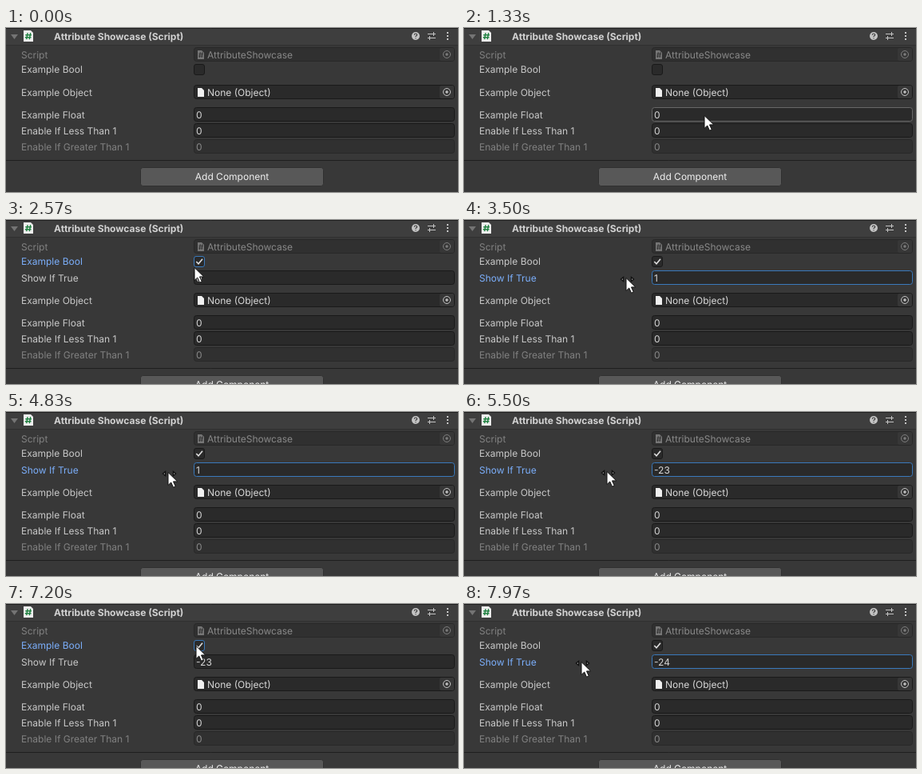
An HTML page for the animation above (8000 ms loop, 566 by 205 pixels).

```html
<!DOCTYPE html>
<html lang="en">
<head>
<meta charset="utf-8">
<title>Inspector</title>
<style>
html, body { margin: 0; width: 100%; height: 100%; overflow: hidden; background: #383838; }
svg { display: block; }
text { font: 12px Inter, sans-serif; fill: #c8c8c8; white-space: pre; text-rendering: geometricPrecision; }
.title { font-weight: 700; fill: #d2d2d2; }
.value { fill: #d8d8d8; }
.button { fill: #eee; }
.disabled { opacity: .5; }
.box { fill: #2a2a2a; stroke: #191919; }
.box.hover { stroke: #686868; }
.box.focus { stroke: #3a79bb; }
text.focus { fill: #7baefa; }
</style>
</head>
<body>
<svg id="stage" width="566" height="205" viewBox="0 0 566 205">
  <rect width="566" height="205" fill="#383838"/>
  <rect width="566" height="21" fill="#3e3e3e"/>
  <path d="M0 .5H566" stroke="#1f1f1f"/>
  <path d="M0 21.5H566" stroke="#303030"/>
  <path d="M6 8H15L10.5 14Z" fill="#747474"/>
  <path d="M22 3H31L34 6V17H22Z" fill="#eee"/>
  <path d="M27.1 6.2L25.7 14.2M30.7 6.2L29.3 14.2M24.3 8.8H32M23.8 11.7H31.5" stroke="#1f8040" stroke-width="1.4" fill="none"/>
  <text class="title" x="60" y="15">Attribute Showcase (Script)</text>
  <circle cx="513" cy="10" r="5" fill="#c4c4c4"/>
  <path d="M511.3 8.6Q511.5 7 513 7T514.7 8.6Q514.6 9.6 513 10.3V11M513 12.2V13.3" fill="none" stroke="#3e3e3e" stroke-width="1.2"/>
  <path d="M528 7.5H538M535.5 5V10M528 12.5H538M530.5 10V15" stroke="#c4c4c4"/>
  <path d="M552 5h2v2h-2zM552 9h2v2h-2zM552 13h2v2h-2z" fill="#c4c4c4"/>
  <g id="rows"></g>
  <g id="lower">
    <path d="M0 165.5H566" stroke="#1f1f1f"/>
    <rect x="168.5" y="174.5" width="229" height="23" rx="3" fill="#585858" stroke="#303030"/>
    <text class="button" x="283" y="190" text-anchor="middle">Add Component</text>
  </g>
  <g id="pointer">
    <path d="M1 .5V16.5L4.7 13L7.5 19.2L10.3 18L7.5 11.9H12.7Z" fill="#fff" stroke="#111" stroke-width="1"/>
    <path id="slide" d="M-5.5 2L-2.5 -.5V4.5ZM10.5 2L7.5 -.5V4.5Z" fill="#fff" stroke="#111" stroke-width="1.5"/>
  </g>
</svg>
<script>
const $ = id => document.getElementById(id);
const LOOP = 8000;

function add(parent, tag, attrs = {}, content = '') {
  const el = document.createElementNS('http://www.w3.org/2000/svg', tag);
  for (const key in attrs) el.setAttribute(key, attrs[key]);
  el.textContent = content;
  parent.appendChild(el);
  return el;
}

function addRow(parent, name, top, { disabled = false, value = '0', object = false } = {}) {
  const g = add(parent, 'g', disabled ? { class: 'disabled' } : {});
  const label = add(g, 'text', { x: 19, y: top + 13 }, name);
  const box = add(g, 'rect', { class: 'box', x: 235.5, y: top - .5, width: 326, height: 17, rx: 3 });
  const text = add(g, 'text', { class: 'value', x: object ? 252 : 238, y: top + 13 }, value);
  if (object) {
    add(g, 'rect', { x: 543, y: top, width: 18, height: 16, rx: 2, fill: '#373737' });
    add(g, 'circle', { cx: 552, cy: top + 8, r: 4.5, fill: 'none', stroke: '#c4c4c4' });
    add(g, 'circle', { cx: 552, cy: top + 8, r: 1.7, fill: '#c4c4c4' });
    add(g, 'path', { d: `M240 ${top + 3}h5l3 3v8h-8z`, fill: disabled ? '#b5b5b5' : '#f0f0f0' });
    if (disabled) add(g, 'path', { d: `M243.3 ${top + 5}l-1 7M246 ${top + 5}l-1 7M241.5 ${top + 7.5}h5.5M241 ${top + 10}h5.5`, stroke: '#333' });
  }
  return { g, label, box, text, top, disabled };
}

const rows = $('rows'), lower = $('lower');
addRow(rows, 'Script', 25, { disabled: true, object: true, value: 'AttributeShowcase' });
const boolLabel = add(rows, 'text', { x: 19, y: 56 }, 'Example Bool');
const toggle = add(rows, 'rect', { class: 'box', x: 235.5, y: 45.5, width: 13, height: 13, rx: 2.5 });
const check = add(rows, 'path', { d: 'M238.3 52L241 54.8L246 48.8', fill: 'none', stroke: '#ddd', 'stroke-width': 1.6 });
const extra = addRow(rows, 'Show If True', 64);
const lowerRows = [
  addRow(lower, 'Example Object', 72, { object: true, value: 'None (Object)' }),
  addRow(lower, 'Example Float', 100),
  addRow(lower, 'Enable If Less Than 1', 120),
  addRow(lower, 'Enable If Greater Than 1', 140, { disabled: true })
];

const linear = p => p;
const smooth = p => p * p * (3 - 2 * p);
const easeOut = p => 1 - (1 - p) ** 3;

// Pointer path: time, x, y, easing towards this point
const path = [
  [1100, 412, 203, linear], [1330, 300, 109, linear], [1900, 238, 54, easeOut],
  [2470, 238, 54, linear], [2570, 235, 59, linear], [2640, 236, 66, linear], [2830, 197, 72, easeOut],
  [3470, 197, 72, linear], [3500, 202, 72, linear], [3900, 225, 72, smooth],
  [4530, 225, 72, linear], [4835, 202, 75, linear], [5170, 178, 74, linear],
  [5470, 178, 74, linear], [6050, 236, 53, smooth], [6170, 236, 53, linear],
  [6230, 238, 52, linear], [6270, 238, 52, linear], [6300, 237, 52, linear],
  [7200, 237, 52, linear], [7730, 146, 72, smooth]
];

function pointerAt(t) {
  const next = path.findIndex(k => k[0] > t);
  if (next < 0) return path[path.length - 1].slice(1, 3);
  if (next === 0) return path[0].slice(1, 3);
  const [t0, x0, y0] = path[next - 1], [t1, x1, y1, ease] = path[next];
  const p = ease((t - t0) / (t1 - t0));
  return [Math.round(x0 + (x1 - x0) * p), Math.round(y0 + (y1 - y0) * p)];
}

function valueAt(t, x) {
  if (t < 3500) return 0;
  if (t < 5170) return x - 201;
  return t < 7970 ? -23 : -24;
}

function focusAt(t) {
  if (t < 1930) return '';
  if (t < 3500) return 'bool';
  if (t < 6070) return 'extra';
  return t < 7900 ? 'bool' : 'extra';
}

function render(t) {
  const [x, y] = pointerAt(t);
  const visible = t >= 1100;
  const open = t >= 2030 && t < 6170 || t >= 7170;
  const focus = focusAt(t);
  const shift = open ? 20 : 0;
  const inside = (left, top, right, bottom) => visible && x >= left && x < right && y >= top && y < bottom;
  const setBox = (box, hover, focused) => box.setAttribute('class', 'box' + (focused ? ' focus' : hover ? ' hover' : ''));
  const show = (el, on) => el.setAttribute('visibility', on ? 'visible' : 'hidden');

  lower.setAttribute('transform', `translate(0 ${shift})`);
  show(extra.g, open);
  show(check, open);
  boolLabel.setAttribute('class', focus === 'bool' ? 'focus' : '');
  extra.label.setAttribute('class', focus === 'extra' ? 'focus' : '');
  extra.text.textContent = valueAt(t, x);

  setBox(toggle, inside(235, 44, 250, 60), focus === 'bool');
  setBox(extra.box, open && inside(235, 63, 562, 81), focus === 'extra');
  for (const row of lowerRows) {
    const top = row.top + shift;
    setBox(row.box, !row.disabled && inside(235, top - 1, 562, top + 17));
  }

  show($('pointer'), visible);
  show($('slide'), visible && open && inside(19, 63, 235, 81));
  $('pointer').setAttribute('transform', `translate(${x} ${y})`);
}

const start = performance.now();
function tick() {
  render((performance.now() - start) % LOOP);
  requestAnimationFrame(tick);
}
tick();
</script>
</body>
</html>
```
